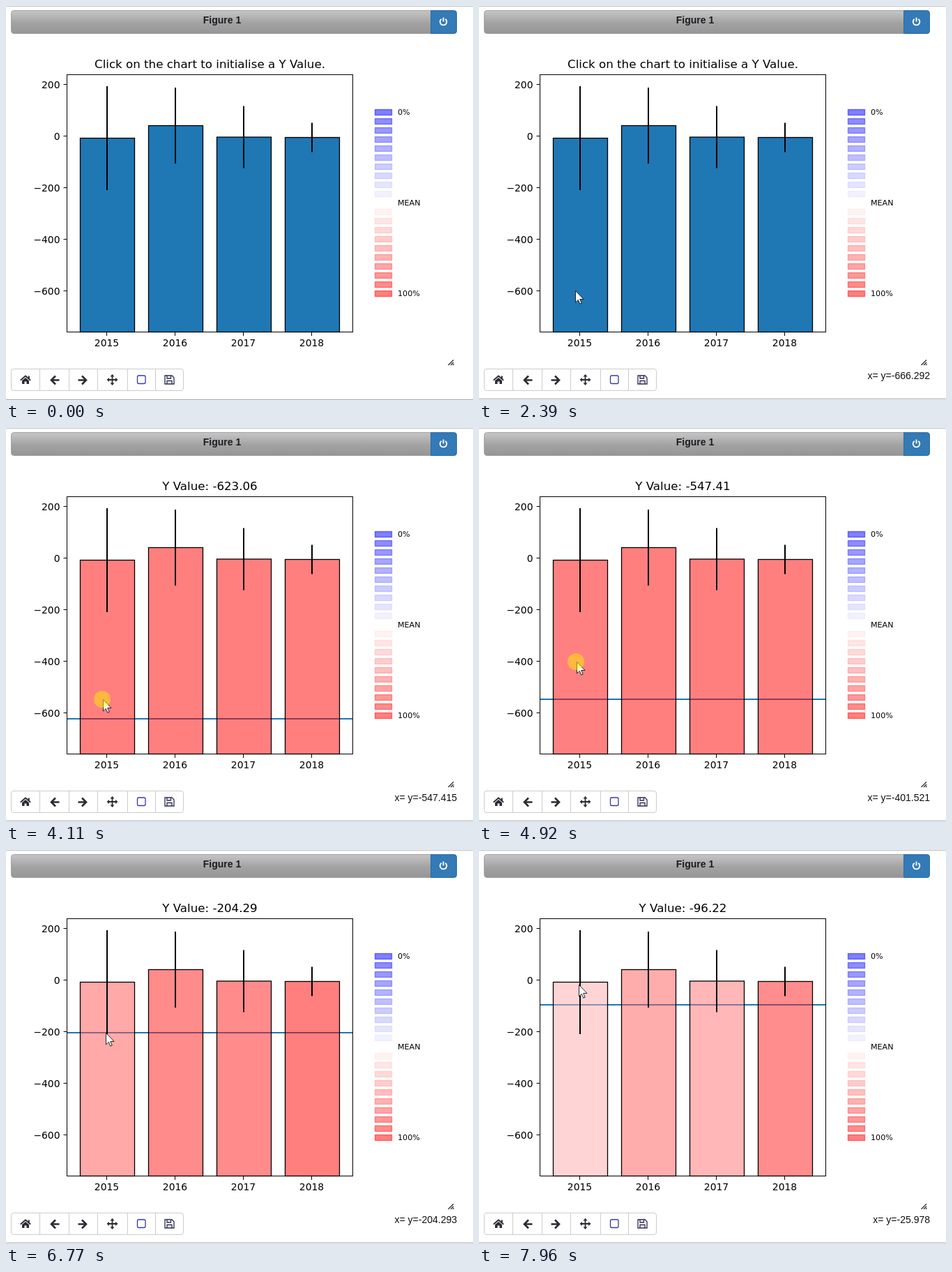
These frames come from a looping animation (670 px wide and 565 px high, 8 s). An HTML page:

```html
<!DOCTYPE html>
<html lang="en">
<head>
<meta charset="utf-8">
<title>Interactive bar chart</title>
<style>
  html, body { margin: 0; width: 100%; height: 100%; overflow: hidden; background: #fff; }
  svg { display: block; }
  .plot { font-family: "DejaVu Sans", sans-serif; font-size: 13.89px; }
  .ui { font-family: "Liberation Sans", Arial, sans-serif; font-size: 14px; }
  .mid { text-anchor: middle; }
  .end { text-anchor: end; }
  .icon { fill: none; stroke: #2b2b33; stroke-width: 2.6; }
</style>
</head>
<body>
<svg width="670" height="565" viewBox="0 0 670 565">
  <defs>
    <linearGradient id="head" x2="0" y2="1">
      <stop stop-color="#c6c6c6"/><stop offset=".55" stop-color="#a2a2a2"/><stop offset="1" stop-color="#969696"/>
    </linearGradient>
  </defs>
  <rect width="670" height="1" fill="#c4c4c4"/>
  <rect id="rule" width="670" height="1" fill="#a6a6a6"/>

  <!-- header -->
  <rect x="7.5" y="6.5" width="639" height="33" rx="4" fill="url(#head)" stroke="#a0a0a0"/>
  <text class="ui mid" x="310" y="25" font-weight="bold" fill="#1c1c22">Figure 1</text>
  <path d="M609.5 6.5H642.500a4 4 0 0 1 4 4V35.500a4 4 0 0 1-4 4H609.500Z" fill="#337ab7" stroke="#2e6da4"/>
  <path d="M624.700 18.700a4.800 4.800 0 1 0 5.600 0M627.500 16.500V22.500" fill="none" stroke="#fff" stroke-width="1.9"/>

  <!-- toolbar -->
  <rect x="7.5" y="520.5" width="247" height="31" rx="3.5" fill="#fff" stroke="#ccc"/>
  <path d="M48.500 521V551M90.500 521V551M131.500 521V551M174.500 521V551M214.500 521V551" stroke="#ccc"/>
  <path class="icon" style="stroke-width:1.8" d="M20.800 536.800L28 530.500L35.200 536.800"/>
  <path d="M23 537.300L28 533L33 537.300V542H29.500V538.500H26.500V542H23ZM31.800 530.500h2v4h-2Z" fill="#2b2b33"/>
  <path id="arrow" class="icon" d="M76.500 536.500H65.500M71 530.500L65 536.500L71 542.500"/>
  <use href="#arrow" transform="matrix(-1 0 0 1 180 0)"/>
  <path class="icon" style="stroke-width:1.8" d="M147 536H158M152.500 530.500V541.500"/>
  <path d="M144.500 536l3.500-3v6ZM160.500 536l-3.500-3v6ZM152.500 528l3 3.500h-6ZM152.500 544l3-3.500h-6Z" fill="#2b2b33"/>
  <rect x="188.500" y="530" width="11.5" height="11.5" rx="2" fill="none" stroke="#3838a4" stroke-width="1.3"/>
  <path d="M228 530H238L241 533V542H228ZM231 530V534H236.500V530M231 542V537.500H238V542" fill="none" stroke="#2c2c50" stroke-width="1.3"/>
  <path d="M634.500 515L642 507.500M638 515L642 511M641 515L642.500 513.500" stroke="#222" stroke-width="1.2"/>
  <text id="coords" class="ui end" x="647" y="535" fill="#111"></text>

  <!-- chart -->
  <g class="plot">
    <text id="title" class="mid" x="292.5" y="89" font-size="16.67"></text>
    <rect id="level" x="88" width="409" height="2" fill="#1f77b4"/>
    <g id="bars" stroke="#000" stroke-width="1.3"></g>
    <g id="errors" stroke="#000" stroke-width="2"></g>
    <rect x="87.5" y="98.5" width="410" height="369" fill="none" stroke="#000"/>
    <g id="ticks"></g>
    <g id="legend" font-size="11.11"></g>
  </g>

  <path id="cursor" d="M.5 .5V17L4.300 13.400L6.800 19.200L9.200 18.200L6.700 12.500H12Z" fill="#fff" stroke="#111" stroke-width=".9"/>
  <circle id="halo" r="12" fill="#fff000" fill-opacity=".5"/>
</svg>
<script>
const LOOP = 8000, HOLD = 150, REDRAW = 200, LAG = 80;
const $ = id => document.getElementById(id);

function add(parent, tag, attrs, text) {
  const el = document.createElementNS("http://www.w3.org/2000/svg", tag);
  for (const k in attrs) el.setAttribute(k, attrs[k]);
  if (text) el.textContent = text;
  return $(parent).appendChild(el);
}

// mean and spread of each year, in pixels
const series = [[189.5, 74.5], [171.5, 54.5], [188, 44.5], [188.5, 21]];
const bars = series.map(([mean, spread], i) => {
  const x = 145 + 98 * i;
  add("errors", "path", { d: `M${x} ${mean - spread}V${mean + spread}` });
  add("ticks", "path", { d: `M${x - .5} 468v5`, stroke: "#000" });
  add("ticks", "text", { x: x - .5, y: 488, class: "mid" }, String(2015 + i));
  return add("bars", "rect", { x: x - 38.5, y: mean, width: 78, height: 467.5 - mean });
});

for (let v = 200; v >= -600; v -= 200) {
  const y = 186.5 - v * .37;
  add("ticks", "path", { d: `M82.5 ${y}h5`, stroke: "#000" });
  add("ticks", "text", { x: 77.5, y: y + 5, class: "end" }, String(v).replace("-", "\u2212"));
}

for (let k = 0; k <= 20; k++) {
  if (k === 10) continue;
  const c = Math.round(25.5 * Math.min(k, 20 - k));
  const color = k < 10 ? `rgb(${c},${c},255)` : `rgb(255,${c},${c})`;
  add("legend", "rect", {
    x: 529.5, y: 148.5 + 13 * k, width: 24, height: 8,
    fill: color, stroke: color, opacity: 1, "fill-opacity": .5, "stroke-opacity": .5, "stroke-width": 1.39
  });
}
["0%", "MEAN", "100%"].forEach((s, i) => add("legend", "text", { x: 562, y: 156 + 130 * i }, s));

// pointer stops: arrival, place, and when the button goes down there
const stops = [
  { at: 130, x: 569, y: 563 },
  { at: 800, x: 58, y: 462 },
  { at: 1300, x: 136, y: 433, press: 2060 },
  { at: 2385, x: 137, y: 408 },
  { at: 3180, x: 136, y: 417, press: 3250 },
  { at: 4030, x: 138, y: 389, press: 4080 },
  { at: 4840, x: 139, y: 335, press: 4900 },
  { at: 5700, x: 141, y: 278, press: 5800 },
  { at: 6065, x: 142, y: 262, press: 6220 },
  { at: 7090, x: 143, y: 222, press: 7150 },
  { at: 7433, x: 143, y: 196 },
  { at: 7960, x: 142, y: 193 }
];
const clicks = stops.filter(s => s.press);

// each move ends on arrival and takes 5 ms per pixel, if there is time
function pointer(t) {
  const i = stops.findIndex(s => s.at > t);
  if (i <= 0) return i ? stops.at(-1) : stops[0];
  const a = stops[i - 1], b = stops[i];
  const free = b.at - (a.press ? a.press + HOLD : a.at);
  const span = Math.min(free, 5 * Math.hypot(b.x - a.x, b.y - a.y));
  const f = Math.max(0, 1 - (b.at - t) / span);
  const e = f * f * (3 - 2 * f);
  return { x: a.x + (b.x - a.x) * e, y: a.y + (b.y - a.y) * e };
}

const valueAt = y => -666.2918 + (433 - y) * 2.701746;

function readout(t) {
  t -= LAG;
  // the readout stalls while the chart recomputes
  const busy = clicks.find(c => t > c.press + HOLD + 43 && t < c.press + HOLD + REDRAW);
  const { x, y } = pointer(busy ? busy.press + HOLD + 43 : t);
  const inside = x > 87 && x < 498 && y < 467;
  return inside ? "x= y=" + Number(valueAt(Math.round(y)).toPrecision(6)) : "";
}

// red for a level far below the mean, by the normal distribution
function tint(level, [mean, spread]) {
  const z = (level - mean) / spread;
  const c = Math.round(255 * (1 - Math.tanh(.798 * (z + .0447 * z ** 3))));
  return `rgb(255,${c},${c})`;
}

const show = (id, on) => $(id).style.display = on ? "" : "none";
const place = (id, x, y) => $(id).setAttribute("transform", `translate(${x} ${y})`);

function draw(now) {
  const t = now % LOOP;
  const { x, y } = pointer(t);
  const shown = clicks.findLast(c => t >= c.press + HOLD + REDRAW);

  $("rule").setAttribute("y", t < 2020 ? 564 : 563);
  place("cursor", x + 1, y);
  place("halo", x, y);
  show("cursor", t >= 130);
  show("halo", clicks.some(c => t >= c.press && t < c.press + HOLD));
  show("level", shown);
  $("coords").textContent = readout(t);
  $("title").textContent = shown
    ? "Y Value: " + valueAt(shown.y).toFixed(2)
    : "Click on the chart to initialise a Y Value.";
  if (shown) $("level").setAttribute("y", shown.y - 1);
  bars.forEach((bar, i) => {
    bar.setAttribute("fill", shown ? tint(shown.y, series[i]) : "#1f77b4");
    bar.setAttribute("fill-opacity", shown ? .5 : 1);
  });
  requestAnimationFrame(draw);
}
requestAnimationFrame(draw);
</script>
</body>
</html>
```
